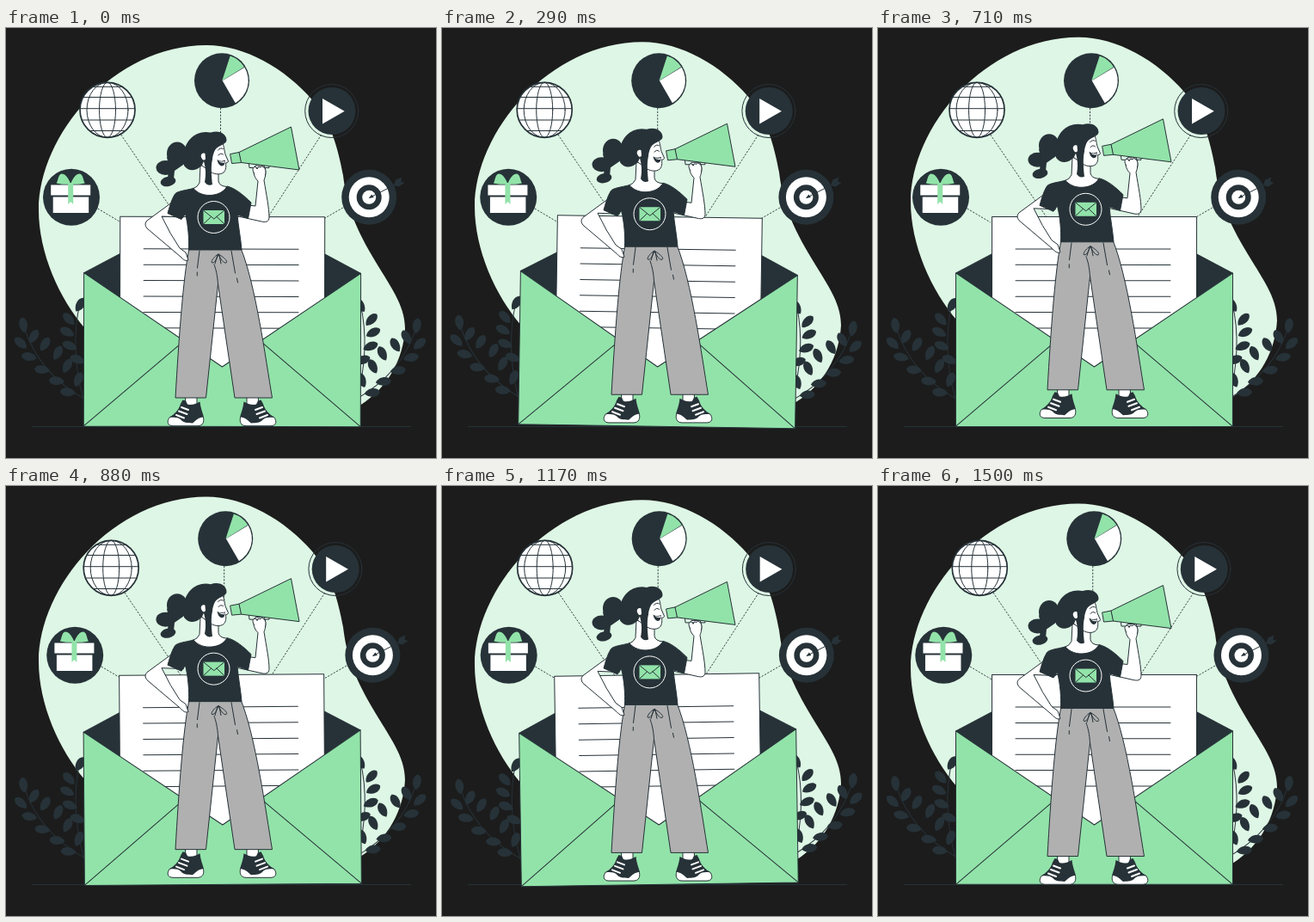
These frames come from a looping animation (500 px wide and 500 px high, 1540 ms). An HTML page:

```html
<!DOCTYPE html>
<html lang="en">
<head>
<meta charset="utf-8">
<title>Newsletter announcement</title>
<style>
html, body { margin: 0; width: 100%; height: 100%; overflow: hidden; background: #1c1c1c; }
svg { display: block; width: 100%; height: 100%; }
.d { fill: #263238; }
.g { fill: #92e3a9; }
.w { fill: #fff; }
.s { stroke: #263238; stroke-width: 1; stroke-linejoin: round; stroke-linecap: round; }
.n { fill: none; }
.dash { fill: none; stroke: #263238; stroke-width: .9; stroke-dasharray: 2.2 1.6; }
</style>
</head>
<body>
<svg viewBox="0 0 500 500">
  <path d="M30 463.5H471" stroke="#263238" stroke-width="1"/>

  <path id="blob" fill="#def6e5" d="M233 20.500C278 20.500 325 48 356 84C378 110 386 140 392 172C396 205 404 228 426 266C446 300 464 322 464 350C462 385 445 418 412 439L300 450L92 350C62 315 38 262 38 212C38 125 125 20.600 233 20.500Z"/>

  <g id="icons">
    <path class="dash" d="M107 210L134 226M134 124L202 224M249.800 93V140M367 124L303 223M392 209L366 224"/>

    <g id="gift">
      <circle class="d" cx="76.300" cy="196.800" r="33"/>
      <path class="w" d="M52.500 182.500H98.500V194.500H52.500ZM55 196.500H96.500V215H55Z"/>
      <path class="g" d="M72.500 180H78.500V205L75.500 202L72.500 205Z"/>
      <path class="g" d="M75.500 181.500C73 174 69 169.500 65 169.500C61 170 61 177 59 180.500C65 182 71 182 75.500 181.500C80 182 86 182 92 180.500C90 177 90 170 86 169.500C82 169.500 78 174 75.500 181.500Z"/>
    </g>

    <g id="globe" class="n s">
      <circle class="w" cx="118.300" cy="95.300" r="32" stroke-width="1.700"/>
      <ellipse cx="118.300" cy="95.300" rx="9.500" ry="32"/>
      <ellipse cx="118.300" cy="95.300" rx="24" ry="32"/>
      <path d="M101 68.300H136M90 80.500H147M86 93.700H150M89 107H148M98 119.500H139"/>
    </g>

    <g id="pie"></g>

    <g id="play">
      <circle class="n s" cx="379" cy="96.500" r="31"/>
      <circle class="d" cx="379.300" cy="96.500" r="27.500"/>
      <path class="w" d="M368.300 82V111.500L394 96.800Z"/>
    </g>

    <g id="target">
      <circle class="d" cx="422.500" cy="196.800" r="32"/>
      <circle class="w" cx="422.500" cy="196.800" r="23.500"/>
      <circle class="d" cx="422.500" cy="196.800" r="14.500"/>
      <circle class="w" cx="422.500" cy="196.800" r="8"/>
      <path class="s" d="M423.500 197L456 180.500"/>
      <path class="d" d="M422 198L425.500 193.500L428 197ZM451 183L453.500 176.500L460.500 173.500L459.500 178.500L463.500 180L457 184.500Z"/>
    </g>
  </g>

  <g id="letter">
    <g id="plants"></g>
    <path class="d s" d="M90.500 285L133 262.500H370L412.500 285L370 330H133Z"/>
    <path class="w s" d="M132.500 219.500H370.500V400H132.500Z"/>
    <path id="rules" class="n s"/>
    <path class="g s" d="M90.500 285L251.500 394L412.500 285V463.300H90.500Z"/>
    <path class="n s" d="M90.500 463.300L207 364M412.500 463.300L296 364"/>
  </g>

  <g id="woman">
    <g id="shoes">
      <g id="shoe">
        <path class="w s" d="M209 429H222V440H209Z"/>
        <path class="w s" d="M190 453C186.500 458 188 462.500 194 462.700H223C229 462.500 230.500 458 229.500 453L226 446L202 447Z"/>
        <path class="d" d="M190.500 453C195 449 201 445 203 437L205.500 432.500L209 433.500L211 437.500C216 439 221 437 225.500 434.500C226 441 228.500 447 230 452.500C225 452.500 222 455 217 459.500C211 459 206 459 203.500 455.500C200 452 194 452.500 190.500 453Z"/>
        <path d="M204 441L212 444M201 445.500L210.500 449M198 450L207 453.500" stroke="#fff" stroke-width="2" stroke-linecap="round"/>
      </g>
      <use href="#shoe" transform="matrix(-1 0 0 1 502 0)"/>
    </g>

    <path class="s" fill="#b0b0b0" d="M213 256C206 290 201 360 197 430H232.500L246.500 298L266 430H309.500C302 385 290 297 273 256Z"/>
    <path class="n s" d="M246.500 298C246 288 244 280 242 275M225 259L222.500 279M222.300 284V288M262 259L266.500 285M268.500 291L269.500 296M247 263C242 265 237 273 240 273C243 273 245 268 247 263C251 265 259 271 256 273C253 274 249 268 247 263M246 264L243 274M248 264L250 274"/>

    <path class="w s" d="M194 202L164 224Q160 228 164 233L203 266Q208 272 212 270L209 261L202 256Q191 240 181 219L206 220Z"/>
    <path class="w s" d="M282 206L290 207L293 178C287 172 287 165 290 160L300 160C303 166 302 172 300 177C303 195 306 210 306 220C306 226 301 226 297 225L270 219Z"/>

    <path class="w s" d="M226 160L225 180Q223 185 217 187Q226 198 240 195Q252 194 257 184.500Q248 184 247 178V166Z"/>
    <path class="d s" d="M218 186.500C207 189 199 190 196.500 193C192 200 190 209 188 215.500L204 222.500L208.500 216C212 230 213 245 212.500 258H274C273 245 270 230 269 217L281.500 221.500L285 203C276 194 266 186 257 184C251 196 228 199 218 186.500Z"/>

    <g id="emblem">
      <circle cx="241.500" cy="220" r="18.500" fill="none" stroke="#fff"/>
      <path class="g" d="M229.500 212H254V228H229.500Z"/>
      <path class="n s" d="M229.500 212L241.800 222L254 212M229.500 228L238.500 219.500M254 228L245 219.500"/>
    </g>

    <g id="head">
      <path class="w s" d="M228 140L251 131C254 139 254 143 255 147L258.500 155Q258 157 255.500 157C256 161 256 165 253 168C249 171 243 170 239 168L228 160Z"/>
      <path class="d" d="M207 150C206 130 222 118 238 121.500C249 118 257 124 256.500 131C255 136 247 136 243 142C241 146 240 150 240 153C238 160 239 174 240 182C236 184 233 182 231 179C233 170 232 162 230 155C226 166 213 169 207 160Z"/>
      <g class="d">
        <ellipse cx="199" cy="146" rx="12" ry="13.500"/>
        <ellipse cx="185.500" cy="162.500" rx="11" ry="8.500"/>
        <ellipse cx="188.500" cy="178.500" rx="9" ry="5.500" transform="rotate(-12 188.500 178.500)"/>
        <path d="M187 150L209 143V157L196 166L195 176L188 176L189 160Z"/>
      </g>
      <path class="w" d="M231.500 146C227 144 225.500 149 228 152C229 154 231 154 232 152Z"/>
      <path class="n s" d="M246.500 142Q249.500 138.500 252.500 140.500M247 148Q249.500 144.500 252.500 147"/>
      <path class="d" d="M245.500 153Q250 156 255 153.500Q254.500 161 250.500 160.500Q246.500 159 245.500 153Z"/>
      <path class="w" d="M247 154.200Q251 156.300 254.500 154.700L254 156.500Q250 157.500 247 154.200Z"/>
    </g>

    <g id="horn">
      <path class="n s" stroke-width="2" d="M282.500 158L283 162.500H306V159"/>
      <path class="g s" d="M271 144.500L331.500 115L341 165L273.500 156.500Z"/>
      <path class="g s" d="M261 146.500L271 144.500L273.500 156.500L263 157.500Z"/>
      <path class="w s" d="M288.500 169Q285 163 289 161.500Q291 161 292 164Q293 160 296 162Q297 159.500 300 162Q303 165 301.500 171"/>
    </g>
  </g>
</svg>
<script>
const LOOP = 1540, LEAD = 45;
const el = id => document.getElementById(id);

// Linear interpolation through [position, value] stops
function track(stops, u) {
  let i = 1;
  while (u > stops[i][0]) i++;
  const [a, x] = stops[i - 1], [b, y] = stops[i];
  return x + (y - x) * (u - a) / (b - a);
}

const floatStops = [[0, 0], [.5, -10], [1, 0]];
const swayStops = [[0, 0], [.25, 1], [.75, -1], [1, 0]];
const shakeStops = [0, -1, 2, -4, 4, -4, 4, -4, 2, -1, 0].map((v, i) => [i / 10, v]);

function wedge(cx, cy, r, from, to, cls) {
  const at = a => [cx + r * Math.cos(a * Math.PI / 180), cy - r * Math.sin(a * Math.PI / 180)];
  return `<path class="${cls}" d="M${cx} ${cy}L${at(from)}A${r} ${r} 0 0 1 ${at(to)}Z"/>`;
}

el('pie').innerHTML = '<circle class="d" cx="251.3" cy="61.2" r="32"/>' +
  wedge(251.6, 61.2, 30.3, 72, 32, 'g') + wedge(252, 61.2, 30, 31, -60, 'w');

el('rules').setAttribute('d',
  Array.from({ length: 6 }, (_, i) => `M160 ${257 + 18.4 * i}H340`).join(''));

// Leaves: x, y, tilt in degrees
const leaves = [
  [20, 346, 75], [32, 359, 115], [45, 368, 115], [60, 378, 110], [71, 393, 110], [84, 409, 105],
  [17, 367, 35], [27, 383, 5], [42, 398, 0], [59, 411, 0], [72, 424, 0],
  [86, 322, 115], [73, 339, 40], [71, 354, 20], [74, 370, 15], [83, 386, 15]
];
const leaf = ([x, y, a]) =>
  `<path class="d" transform="translate(${x} ${y})rotate(${a})" d="M-9 -1C-7 -7 5 -7 9 1C4 6 -7 6 -9 -1Z"/>`;
const plant = '<path class="n s" d="M92 432Q38 402 21 348M90 432Q74 372 86 320"/>' +
  leaves.map(leaf).join('');
el('plants').innerHTML = `<g>${plant}</g><g transform="matrix(-1 0 0 1 498 0)">${plant}</g>`;

function draw(ms) {
  const u = (ms + LEAD) % LOOP / LOOP;
  const rise = track(floatStops, u);
  el('blob').setAttribute('transform', `translate(0 ${rise})`);
  el('woman').setAttribute('transform', `translate(0 ${rise + .6})`);
  el('icons').setAttribute('transform', `translate(${track(shakeStops, u)} 0)`);
  el('letter').setAttribute('transform', `rotate(${track(swayStops, u)} 250.5 341.5)`);
}

const start = performance.now();
function tick() {
  draw(performance.now() - start);
  requestAnimationFrame(tick);
}
draw(0);
requestAnimationFrame(tick);
</script>
</body>
</html>
```
